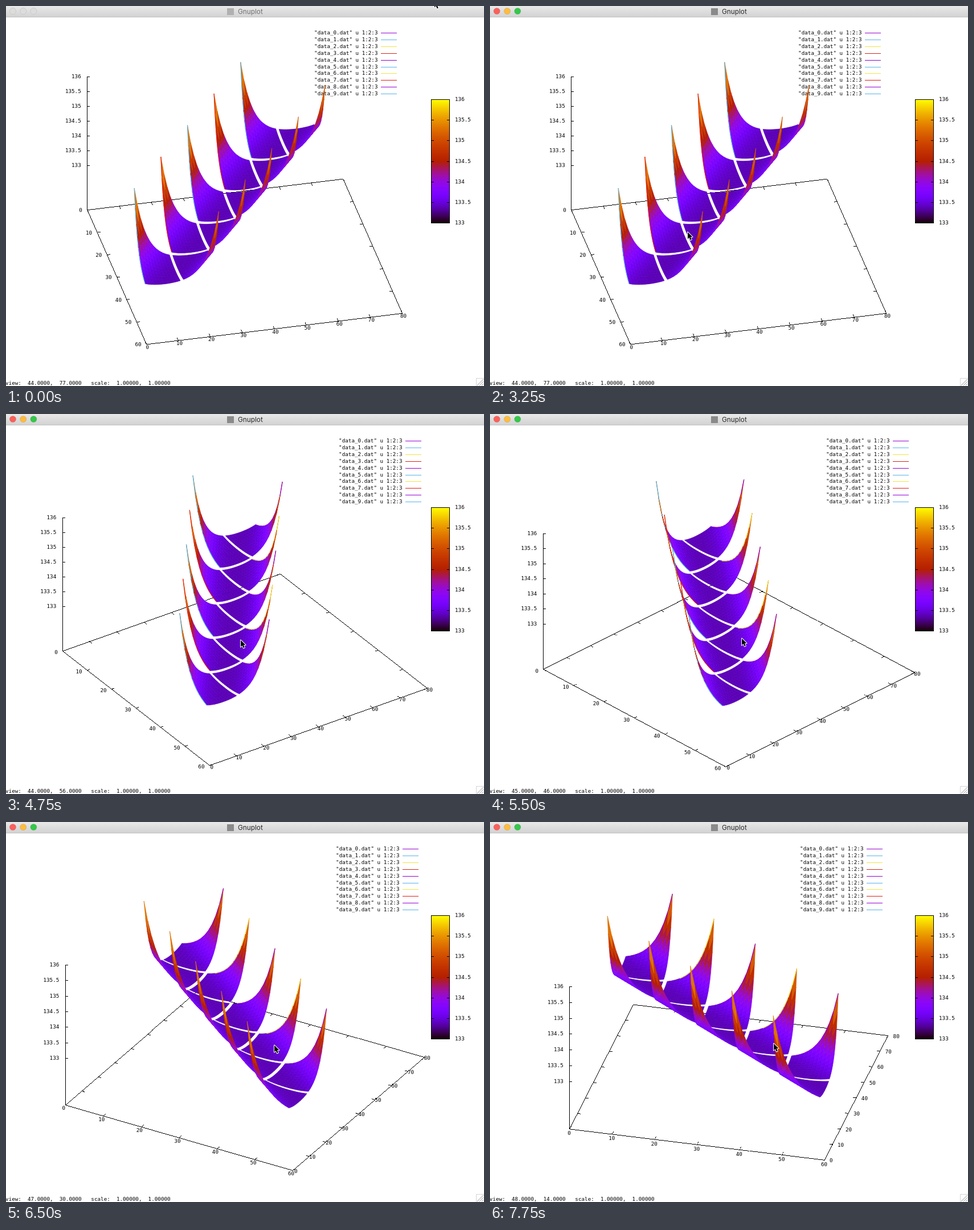
Animation, 839 px wide and 668 px high, one loop 8000 ms. Source, as an HTML page with a canvas:

```html
<!DOCTYPE html>
<html lang="en">
<head>
<meta charset="utf-8">
<title>Gnuplot</title>
<style>
  html, body { margin: 0; width: 100%; height: 100%; overflow: hidden; background: #fff; }
  canvas { display: block; }
</style>
</head>
<body>
<canvas id="stage" width="839" height="668"></canvas>
<script>
const ctx = document.getElementById('stage').getContext('2d');
const LOOP = 8000, STEP = 250;
const MONO = '9.25px "DejaVu Sans Mono", monospace';
const LINE_COLORS = ['#9400d3', '#56b4e9', '#f0e442', '#e51e10'];

// time, value...
const CURSOR = [
  [0, 751, -11], [1250, 402, 331], [2500, 375, 387], [3250, 346, 396], [3500, 346, 396],
  [4750, 411, 396], [5500, 441, 393], [6500, 470, 391], [7750, 497, 388]
];
const VIEW = [[0, 44, 77], [3500, 44, 77], [4750, 44, 56], [5500, 45, 46], [6500, 47, 30], [7750, 48, 14]];
const FOCUS_TIME = 2000;

function track(keys, t) {
  const n = keys.findIndex(k => k[0] > t);
  if (n < 0) return keys[keys.length - 1].slice(1);
  const a = keys[n - 1], b = keys[n], p = (t - a[0]) / (b[0] - a[0]);
  return a.slice(1).map((v, i) => v + (b[i + 1] - v) * p);
}

function line(points, color = '#000', width = 1) {
  ctx.beginPath();
  for (const [x, y] of points) ctx.lineTo(x, y);
  ctx.strokeStyle = color;
  ctx.lineWidth = width;
  ctx.stroke();
}

// Line without antialiasing, as the X11 terminal draws it
function crisp([x1, y1], [x2, y2], color = '#000') {
  const n = Math.max(1, Math.round(Math.max(Math.abs(x2 - x1), Math.abs(y2 - y1))));
  ctx.fillStyle = color;
  for (let i = 0; i <= n; i++) {
    ctx.fillRect(Math.round(x1 + (x2 - x1) * i / n), Math.round(y1 + (y2 - y1) * i / n), 1, 1);
  }
}

function text(str, x, y, align = 'left', color = '#000', font = MONO) {
  ctx.font = font;
  ctx.fillStyle = color;
  ctx.textAlign = align;
  ctx.textBaseline = 'middle';
  ctx.fillText(str, x, y + 0.5);
}

// Palette of rgbformulae 7,5,15 over z = 133..136
function palette(z) {
  const q = Math.min(1, Math.max(0, (z - 133) / 3));
  const rgb = [Math.sqrt(q), q ** 3, Math.max(0, Math.sin(2 * Math.PI * q))];
  return `rgb(${rgb.map(c => Math.round(255 * c))})`;
}

function projector(tilt, turn) {
  const rad = Math.PI / 180;
  const c = Math.cos(turn * rad), s = Math.sin(turn * rad);
  const ct = Math.cos(tilt * rad), st = Math.sin(tilt * rad);
  return (x, y, z = 131.5) => {
    const u = x / 60 - 0.5, v = y / 80 - 0.5, w = (z - 131.5) / 4.5 - 0.5;
    const g = u * s - v * c;
    return [418.7 + 461 * (u * c + v * s), 332 + 337 * (g * ct - w * st), g * st + w * ct];
  };
}

// Five bowls of 12x24 points, each rising to two opposite corners
function height(i, j) {
  return 133.33 + 2.53 * Math.exp(-(i + j) / 3.7) + 2.28 * Math.exp(-(34 - i - j) / 3.7);
}

// Each bowl is split into two square tiles, one per data file
const quads = [], rims = [];
for (let file = 0; file < 10; file++) {
  const bowl = file >> 1, right = file % 2 === 0;
  const first = right ? 12 : 0;
  const at = (i, j) => [12 * bowl + i, 48 - 12 * bowl + j, height(i, j)];
  for (let i = 0; i < 11; i++) {
    for (let j = first; j < first + 11; j++) {
      const corners = [at(i, j), at(i + 1, j), at(i + 1, j + 1), at(i, j + 1)];
      const mean = corners.reduce((sum, p) => sum + p[2], 0) / 4;
      quads.push({ corners, fill: palette(mean) });
    }
    const edge = right ? 23 : 0;
    rims.push({ corners: [at(i, edge), at(i + 1, edge)], right, color: LINE_COLORS[file % 4] });
  }
}

function drawSurface(project, turn) {
  const items = quads.concat(rims.filter(r => r.right ? turn < 60 : turn > 40)).map(item => {
    const pts = item.corners.map(p => project(...p));
    return { item, pts, depth: pts.reduce((sum, p) => sum + p[2], 0) / pts.length };
  });
  items.sort((a, b) => a.depth - b.depth);
  for (const { item, pts } of items) {
    if (item.color) { line(pts, item.color, 1.2); continue; }
    ctx.beginPath();
    for (const [x, y] of pts) ctx.lineTo(x, y);
    ctx.closePath();
    ctx.fillStyle = ctx.strokeStyle = item.fill;
    ctx.lineWidth = 0.7;
    ctx.fill();
    ctx.stroke();
  }
}

function drawAxes(project) {
  const o = project(0, 0), px = project(60, 0), py = project(0, 80), far = project(60, 80);
  const unit = (a, b) => {
    const dx = b[0] - a[0], dy = b[1] - a[1], len = Math.hypot(dx, dy);
    return [dx / len, dy / len];
  };
  const ux = unit(o, px), uy = unit(o, py);
  const tick = (p, dir, len) => crisp(p, [p[0] + dir[0] * len, p[1] + dir[1] * len]);

  [[o, px], [px, far], [far, py], [py, o]].forEach(([a, b]) => crisp(a, b));
  for (let x = 0; x <= 60; x += 10) {
    const p = project(x, 0);
    tick(p, uy, 5);
    tick(project(x, 80), uy, -5);
    if (uy[0] > 0.8) text(x, p[0] - 8.5 * uy[0], p[1] - 8.5 * uy[1], 'right');
    else text(x, p[0] - 8 * uy[0] + 3.5, p[1] - 8 * uy[1] + 1, 'center');
  }
  for (let y = 0; y <= 80; y += 10) {
    const p = project(60, y);
    tick(p, ux, -5);
    tick(project(0, y), ux, 5);
    if (ux[0] > 0.975) text(y, p[0] + 9.5, p[1] + 1.5);
    else text(y, p[0] + 6 * ux[0], p[1] + 6 * ux[1], 'center');
  }

  crisp(o, project(0, 0, 136));
  for (let z = 133; z <= 136; z += 0.5) {
    const p = project(0, 0, z);
    tick(p, [1, 0], 4);
    text(z, p[0] - 10.5, Math.round(p[1]), 'right');
  }
  return far[0];
}

function drawLegend(end) {
  for (let n = 0; n < 10; n++) {
    const y = Math.round(47 + 11.9 * n);
    text(`"data_${n}.dat" u 1:2:3`, end - 32.5, y, 'right');
    crisp([end - 27, y], [end, y], LINE_COLORS[n % 4]);
  }
}

function drawColorBar() {
  const left = 746, top = 164, w = 33, h = 217;
  for (let y = 0; y < h; y++) {
    ctx.fillStyle = palette(136 - 3 * y / h);
    ctx.fillRect(left, top + y, w, 1);
  }
  ctx.strokeStyle = '#000';
  ctx.lineWidth = 1;
  ctx.strokeRect(left + 0.5, top + 0.5, w - 1, h);
  for (let z = 133; z <= 136; z += 0.5) {
    const y = Math.round(top + (136 - z) / 3 * h);
    crisp([left, y], [left + 4, y]);
    crisp([left + w - 5, y], [left + w - 1, y]);
    text(z, 788, y);
  }
}

function drawWindow(active) {
  const bar = ctx.createLinearGradient(0, 0, 0, 19);
  bar.addColorStop(0, '#e9e9e9');
  bar.addColorStop(1, '#d2d2d2');
  ctx.fillStyle = bar;
  ctx.fillRect(0, 0, 839, 19);
  line([[0, 19.5], [839, 19.5]], '#c4c4c4');
  ['#fc605b', '#fdbc40', '#34c84a'].forEach((color, n) => {
    ctx.beginPath();
    ctx.arc(12 + 18.2 * n, 9, 5.6, 0, 7);
    ctx.fillStyle = active ? color : '#dcdcdc';
    ctx.strokeStyle = active ? 'rgba(0,0,0,.12)' : '#c6c6c6';
    ctx.lineWidth = 0.8;
    ctx.fill();
    ctx.stroke();
  });
  ctx.fillStyle = active ? '#8a8a8a' : '#b0b0b0';
  ctx.fillRect(388, 4, 12, 12);
  text('Gnuplot', 407, 9.5, 'left', active ? '#2a2a2a' : '#707070', '11.8px Inter, sans-serif');

  ctx.strokeStyle = '#d4d4d4';
  ctx.lineWidth = 1;
  ctx.strokeRect(825.5, 654.5, 14, 14);
  for (const n of [3, 7, 11]) line([[838 - n, 667], [838, 667 - n]], '#999');
}

function drawCursor(x, y) {
  const shape = [[0, 0], [0, 12], [2.7, 9.4], [4.8, 14], [6.8, 13.1], [4.9, 8.7], [8.5, 8.5]];
  ctx.beginPath();
  for (const [dx, dy] of shape) ctx.lineTo(x + 1 + dx, y + 1.5 + dy);
  ctx.closePath();
  ctx.lineJoin = 'round';
  ctx.lineWidth = 2;
  ctx.strokeStyle = '#fff';
  ctx.stroke();
  ctx.fillStyle = '#000';
  ctx.fill();
}

function draw(t) {
  const [tilt, turn] = track(VIEW, t).map(Math.round);
  const project = projector(tilt, turn);
  ctx.fillStyle = '#fff';
  ctx.fillRect(0, 0, 839, 668);
  const right = drawAxes(project);
  drawLegend(Math.round(right - 10.5));
  drawSurface(project, turn);
  drawColorBar();
  text(`view:  ${tilt.toFixed(4)},  ${turn.toFixed(4)}   scale:  1.00000,  1.00000`, -1, 663);
  drawWindow(t >= FOCUS_TIME);
  drawCursor(...track(CURSOR, t).map(Math.round));
}

let shown = -1;
const start = performance.now();
function tick() {
  const t = Math.floor((performance.now() - start) % LOOP / STEP) * STEP;
  if (t !== shown) draw(shown = t);
  requestAnimationFrame(tick);
}
tick();
</script>
</body>
</html>
```
